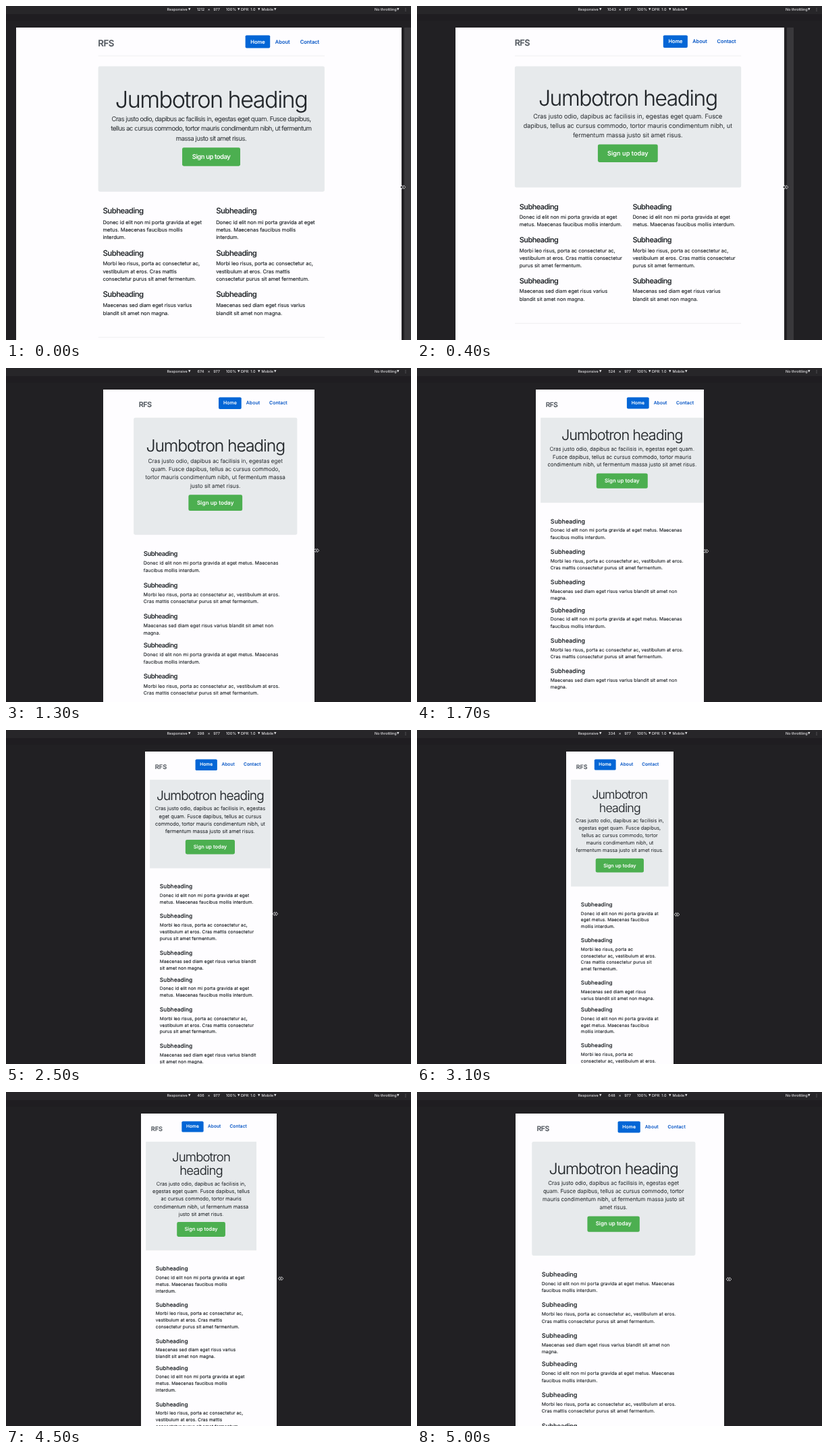
An HTML page that plays this animation: 600 px wide and 496 px high, repeating every 5100 ms.

```html
<!DOCTYPE html>
<html lang="en">
<head>
<meta charset="utf-8">
<title>Responsive font sizes</title>
<style>
  * { box-sizing: border-box; margin: 0; }
  html, body { width: 100%; height: 100%; overflow: hidden; }
  body {
    position: relative; background: #212023; color: #212529;
    font-family: Inter, "Open Sans", sans-serif;
    font-optical-sizing: none; text-rendering: geometricPrecision;
  }

  /* device toolbar */
  #bar { position: absolute; inset: 0 0 auto; height: 12px; background: #272629; }
  #ruler { position: absolute; inset: 12px 0 auto; height: 10px; background: #1f1d21; }
  #bar span {
    position: absolute; top: 0; line-height: 12px; white-space: nowrap;
    font-size: 5.5px; font-weight: 500; color: #e4e3e6;
  }
  #bar .arrow { font: 4.5px/12px "DejaVu Sans", sans-serif; }
  #bar .mid { transform: translateX(-50%); }
  #handle { position: absolute; top: 32px; bottom: 0; width: 10px; background: #39383b; }
  #cursor { position: absolute; width: 9px; height: 7px; transform: translate(-50%, -50%); }

  /* simulated page, laid out in CSS pixels and scaled down */
  #view { position: absolute; top: 32px; bottom: 0; overflow: hidden; background: #fefdff; }
  #page {
    transform: scale(.475); transform-origin: 0 0; padding-top: 24px; line-height: 1.5;
    -webkit-text-stroke: .3px;
  }
  .container { margin: 0 auto; padding: 0 15px; }
  header { display: flex; justify-content: space-between; align-items: flex-start; padding: 0 16px 16px; height: 64px; }
  h3 { line-height: 48px; font-weight: 600; color: #555b62; }
  nav { display: flex; font-weight: 500; color: #0a58c6; }
  nav b { font-weight: 500; padding: .5em 1em; border-radius: 4px; }
  nav b:first-child { background: #0366d6; color: #fff; }
  .jumbotron { padding: 2em .8em; text-align: center; background: #e7eaec; }
  h1 { font-weight: 300; line-height: 1.1; margin-bottom: 7px; }
  .lead { font-weight: 300; margin-bottom: 14px; }
  .button {
    display: block; width: fit-content; margin: 0 auto 16px; padding: .7em 1.55em;
    border-radius: 5px; background: #4caf50; color: #fff; font-weight: 500;
  }
  .marketing { display: flex; flex-wrap: wrap; margin: 48px 0; padding: 0 16px; }
  .column { width: 100%; padding: 0 11px 0 15px; }
  h4 { font-weight: 500; line-height: 1.1; margin-bottom: 8px; }
  .column p { margin-bottom: 16px; }
  .column p + h4 { margin-top: 24px; }
  footer { border-top: 1px solid #dcdcde; height: 60px; }

  .sm .container { width: 540px; }
  .sm .jumbotron { padding: 4em 2.1em; border-radius: 5px; }
  .md .container { width: 720px; }
  .md header { padding: 0 0 16px; height: 65px; margin-bottom: 32px; border-bottom: 1px solid #dcdcde; }
  .md .jumbotron { padding: 4em 1.5em; }
  .md .marketing { padding: 0; }
  .md .column { padding: 0 20px 0 15px; }
  .lg .container { width: 736px; }
  .lg .column { width: 50%; padding: 0 15px; }
</style>
</head>
<body>
<div id="bar">
  <span style="left:238.5px">Responsive</span><span class="arrow" style="left:270px">▼</span>
  <span class="mid" id="size" style="left:288.5px"></span>
  <span class="mid" style="left:300.5px">×</span>
  <span class="mid" style="left:312px">977</span>
  <span style="left:326px">100%</span><span class="arrow" style="left:343px">▼</span>
  <span style="left:348px">DPR: 1.0</span><span class="arrow" style="left:373px">▼</span>
  <span style="left:378.5px">Mobile</span><span class="arrow" style="left:397px">▼</span>
  <span style="left:546px">No throttling</span><span class="arrow" style="left:579px">▼</span>
  <span class="mid" style="left:592px">⋮</span>
</div>
<div id="ruler"></div>
<div id="handle"></div>

<div id="view"><div id="page"><div class="container">
  <header>
    <h3>RFS</h3>
    <nav><b>Home</b><b>About</b><b>Contact</b></nav>
  </header>
  <div class="jumbotron">
    <h1>Jumbotron heading</h1>
    <p class="lead">Cras justo odio, dapibus ac facilisis in, egestas eget quam. Fusce dapibus, tellus ac cursus commodo, tortor mauris condimentum nibh, ut fermentum massa justo sit amet risus.</p>
    <div class="lead button">Sign up today</div>
  </div>
  <div class="marketing"></div>
  <footer></footer>
</div></div></div>

<svg id="cursor" viewBox="0 0 9 7">
  <path d="M.5 3.5 3.4.8V2.7H5.6V.8L8.5 3.5 5.6 6.2V4.3H3.4V6.2Z" fill="#1c1b1e" stroke="#e8e8ea" stroke-width=".7"/>
</svg>

<script>
const $ = selector => document.querySelector(selector);
const LOOP = 5100, STEP = 100, SCALE = .475, CENTER = 300.5;

const paragraphs = [
  'Donec id elit non mi porta gravida at eget metus. Maecenas faucibus mollis interdum.',
  'Morbi leo risus, porta ac consectetur ac, vestibulum at eros. Cras mattis consectetur purus sit amet fermentum.',
  'Maecenas sed diam eget risus varius blandit sit amet non magna.'
];
const column = `<div class="column">${paragraphs.map(p => `<h4>Subheading</h4><p>${p}</p>`).join('')}</div>`;
$('.marketing').innerHTML = column + column;

// [time in ms, viewport width in CSS pixels]
const drag = [
  [-100, 1217], [-35, 1212], [0, 1202], [300, 1075], [600, 928], [800, 842], [865, 806], [900, 789],
  [1200, 700], [1600, 538], [1665, 524], [1700, 524], [2000, 470], [2400, 406], [2465, 398], [2500, 398],
  [2900, 342], [3000, 334], [3100, 334], [3600, 322], [3700, 318], [3800, 318], [4200, 322], [4400, 375],
  [4600, 470], [4800, 566], [4900, 611], [4965, 648], [5000, 650]
];

function widthAt(t) {
  const i = Math.max(1, drag.findIndex(([time]) => time >= t));
  const [t0, w0] = drag[i - 1], [t1, w1] = drag[i];
  return w0 + (w1 - w0) * (t - t0) / (t1 - t0);
}

// responsive font sizes: full size at 1200px, shrinking towards 12px
const BODY = 16;
const fullSizes = { '#page': BODY, h3: 28, h1: 72, '.lead': 20, h4: 24 };

function setFonts(width) {
  const ratio = Math.min(1, width / 1200);
  for (const [selector, full] of Object.entries(fullSizes)) {
    const min = 12 + (full - 12) / 5;
    const size = min + (full - min) * ratio;
    // display sizes are set tight, small text gets looser as it shrinks
    const tracking = size >= 20 ? -.045 : full === BODY ? .017 - .022 * ratio ** 2 : .005;
    for (const el of document.querySelectorAll(selector)) {
      el.style.fontSize = size + 'px';
      el.style.letterSpacing = tracking + 'em';
    }
  }
}

function render(t) {
  const shown = widthAt(t) * SCALE;
  const left = Math.round(CENTER - shown / 2), right = Math.round(CENTER + shown / 2);
  const layout = Math.round(widthAt(t - 100));  // content reflows one step late

  $('#size').textContent = Math.round(widthAt(t - 35));
  Object.assign($('#view').style, { left: left + 'px', width: right - left + 'px' });
  Object.assign($('#handle').style, { left: right + 4 + 'px', display: t < 1200 ? 'block' : 'none' });
  Object.assign($('#cursor').style, { left: right + 1.5 + t * .001 + 'px', top: 268.5 + t * .0018 + 'px' });

  const page = $('#page');
  page.style.width = layout + 'px';
  page.classList.toggle('sm', layout >= 576);
  page.classList.toggle('md', layout >= 768);
  page.classList.toggle('lg', layout >= 992);
  setFonts(layout);
}

let last = -1;
function tick() {
  const t = Math.floor(performance.now() % LOOP / STEP) * STEP;
  if (t !== last) render(last = t);
  requestAnimationFrame(tick);
}
tick();
</script>
</body>
</html>
```
